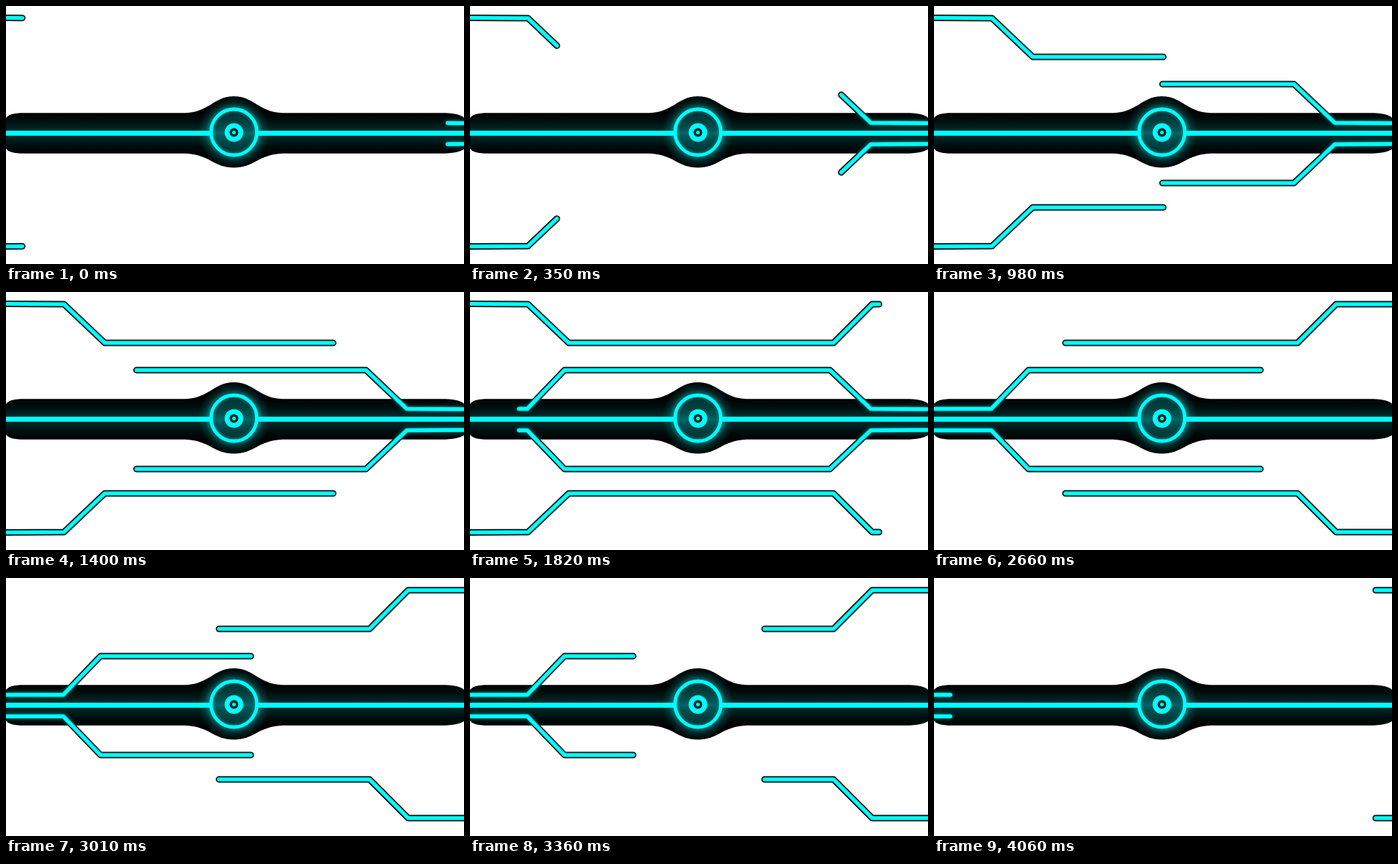
An HTML page with a canvas for the animation above (4.2 s loop, 640 by 360 pixels).

```html
<!DOCTYPE html>
<html>
<head>
<meta charset="utf-8">
<style>
html, body { margin: 0; width: 100%; height: 100%; overflow: hidden; background: #fff; }
canvas { display: block; }
</style>
</head>
<body>
<canvas id="stage" width="640" height="360"></canvas>
<script>
const ctx = document.getElementById('stage').getContext('2d');
const CYAN = '#00ffff';
const LOOP = 4200, STEP = 70, LAST = 58, HALF = 30;
const CX = 318.5, CY = 176;

const outer = [[0, 16.5], [81, 17], [138, 71], [508, 71], [562, 17], [640, 17]];
const inner = [[640, 163.5], [560, 163], [503, 109], [132, 109], [80, 163], [0, 163]];
const mirror = (pts, axis) => pts.map(([x, y]) => [x, 2 * axis - y]);

function makeTrace(pts) {
  const path = new Path2D();
  let length = 0;
  pts.forEach(([x, y], i) => {
    if (i) length += Math.hypot(x - pts[i - 1][0], y - pts[i - 1][1]);
    path.lineTo(x, y);
  });
  return { path, length };
}
const traces = [outer, mirror(outer, 176), inner, mirror(inner, 178)].map(makeTrace);

// Dark halo around the bar and the central ring
const halo = new Path2D(
  'M0 156 Q4 150 20 149.3 L250 149.3 C285 148 290 126 318.5 126 ' +
  'C347 126 352 148 387 149.3 L614 149.3 Q634 150 640 156 ' +
  'L640 200 Q632 205 614 205.7 L387 205.7 C352 207 347 225.5 318.5 225.5 ' +
  'C290 225.5 285 207 250 205.7 L20 205.7 Q4 205 0 199 Z');

const bandFill = ctx.createLinearGradient(0, 149, 0, 206);
[[0, 2], [0.2, 14], [0.38, 36], [0.5, 62], [0.62, 36], [0.8, 14], [1, 2]]
  .forEach(([p, v]) => bandFill.addColorStop(p, `rgb(0,${v},${v})`));

const ringGlow = ctx.createRadialGradient(CX, CY, 0, CX, CY, 50);
[[0, 0.22], [0.5, 0.2], [0.62, 0.4], [0.7, 0.36], [0.82, 0.13], [1, 0]]
  .forEach(([p, a]) => ringGlow.addColorStop(p, `rgba(0,255,255,${a})`));

function strokeTraces(head, tail, width, color) {
  ctx.lineWidth = width;
  ctx.strokeStyle = color;
  for (const { path, length } of traces) {
    ctx.setLineDash([(head - tail) * length, 2000]);
    ctx.lineDashOffset = -tail * length;
    ctx.stroke(path);
  }
  ctx.setLineDash([]);
}

function circle(r, width) {
  ctx.beginPath();
  ctx.arc(CX, CY + (r < 20 ? 0.5 : 0), r, 0, Math.PI * 2);
  if (width) {
    ctx.lineWidth = width;
    ctx.stroke();
  } else ctx.fill();
}

function draw(n) {
  const head = Math.min(1, (n + 1) / HALF);
  const tail = Math.max(0, (n + 1 - HALF) / HALF);

  ctx.fillStyle = '#fff';
  ctx.fillRect(0, 0, 640, 360);
  ctx.lineCap = ctx.lineJoin = 'round';
  strokeTraces(head, tail, 9, '#000');

  ctx.save();
  ctx.clip(halo);
  ctx.fillStyle = bandFill;
  ctx.fillRect(0, 120, 640, 112);
  ctx.fillStyle = ringGlow;
  ctx.fillRect(260, 120, 120, 112);
  ctx.shadowColor = 'rgba(0,255,255,0.6)';
  ctx.shadowBlur = 6;
  strokeTraces(head, tail, 4, CYAN);
  ctx.restore();

  strokeTraces(head, tail, 6.6, 'rgba(0,255,255,0.4)');
  strokeTraces(head, tail, 5, CYAN);

  ctx.fillStyle = ctx.strokeStyle = CYAN;
  ctx.fillRect(0, 174, 286, 7);
  ctx.fillRect(351, 174, 289, 7);
  circle(32, 4.8);
  circle(9.5, 7);
  ctx.fillStyle = '#002424';
  circle(6);
  ctx.fillStyle = CYAN;
  circle(2.5);
}

function tick(now) {
  draw(Math.min(LAST, Math.floor(now % LOOP / STEP)));
  requestAnimationFrame(tick);
}
draw(0);
requestAnimationFrame(tick);
</script>
</body>
</html>
```
